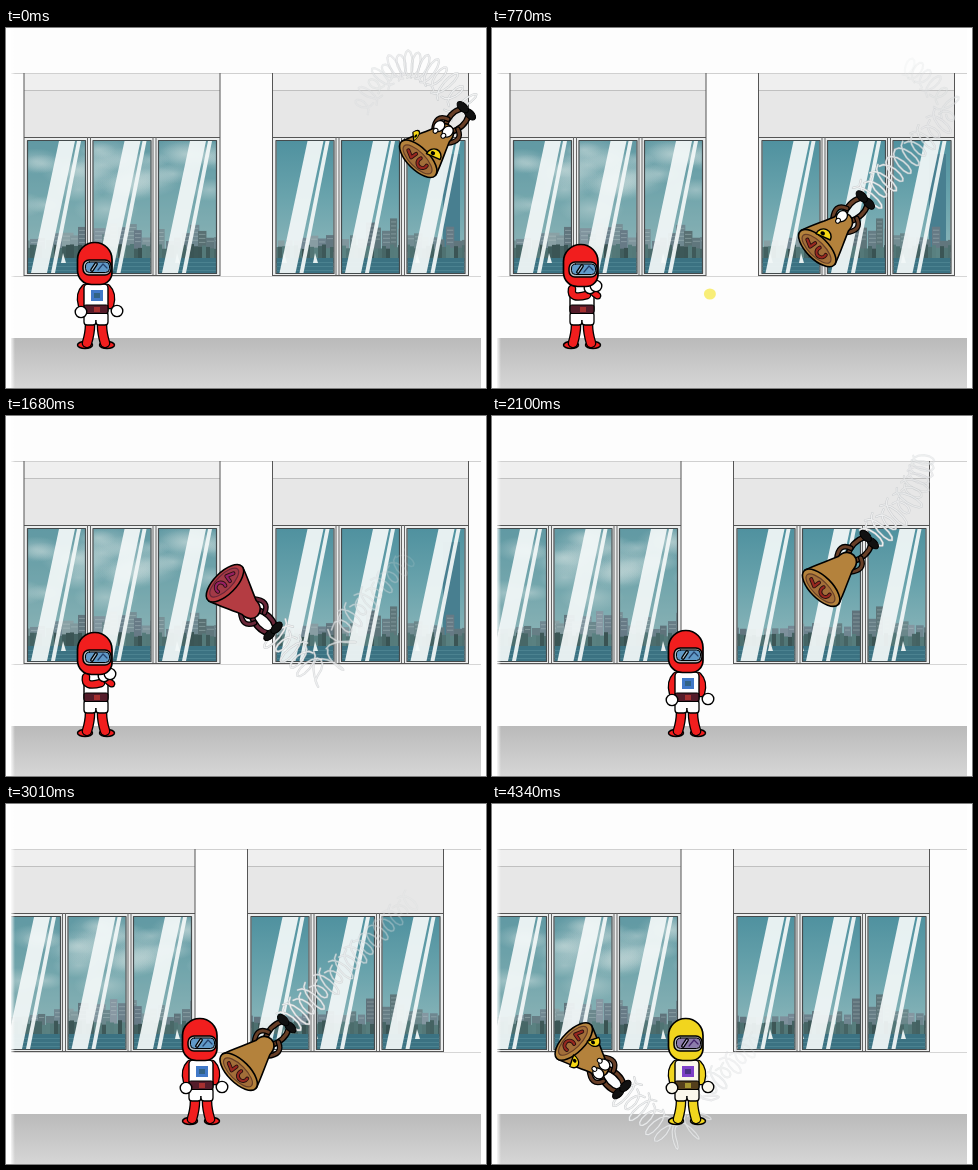
Write an HTML page with a canvas that moves like this. It is 480x360 px and loops after 4.41 s.

```html
<!DOCTYPE html>
<html lang="en">
<head>
<meta charset="utf-8">
<title>Hallway fight</title>
<style>
html, body { margin: 0; width: 100%; height: 100%; overflow: hidden; background: #fff; }
canvas { display: block; width: 480px; height: 360px; }
</style>
</head>
<body>
<canvas id="stage" width="480" height="360"></canvas>
<script>
const ctx = document.getElementById('stage').getContext('2d');
const STEP = 70, STEPS = 63, CUT = 1.75, SPEED = 155, TAU = Math.PI * 2;
const SIDES = [-1, 1];

const tint = (h, s, l) => `hsl(${h},${s}%,${l}%)`;
const clamp = v => Math.min(1, Math.max(0, v));
const rand = n => {
  const v = Math.sin(n * 12.9898) * 43758.5453;
  return v - Math.floor(v);
};

function rect(x, y, w, h, fill) {
  ctx.fillStyle = fill;
  ctx.fillRect(x, y, w, h);
}

function paint(fill, line = 1.4, color = '#000') {
  if (fill) { ctx.fillStyle = fill; ctx.fill(); }
  if (line) { ctx.lineWidth = line; ctx.strokeStyle = color; ctx.stroke(); }
}

function oval(x, y, rx, ry, fill, line, color) {
  ctx.beginPath();
  ctx.ellipse(x, y, rx, ry, 0, 0, TAU);
  paint(fill, line, color);
}

function box(x, y, w, h, r, fill, line) {
  ctx.beginPath();
  ctx.roundRect(x, y, w, h, r);
  paint(fill, line);
}

// A curved thick stroke with a dark edge
function limb(a, b, c, width, fill) {
  ctx.beginPath();
  ctx.moveTo(...a);
  ctx.quadraticCurveTo(...b, ...c);
  paint(null, width + 2.6);
  paint(null, width, fill);
}

function blend(x0, y0, x1, y1, ...colors) {
  const g = ctx.createLinearGradient(x0, y0, x1, y1);
  colors.forEach((c, i) => g.addColorStop(i / (colors.length - 1), c));
  return g;
}

// ---------- scenery ----------
function cloud(x, y, r) {
  const g = ctx.createRadialGradient(0, 0, 0, 0, 0, r);
  g.addColorStop(0, 'rgba(196,216,216,.5)');
  g.addColorStop(1, 'rgba(196,216,216,0)');
  ctx.save();
  ctx.translate(x, y);
  ctx.scale(1.7, .8);
  rect(-r, -r, 2 * r, 2 * r, g);
  ctx.restore();
}

function cityView() {
  rect(0, 112, 480, 136, blend(0, 112, 0, 225, '#4f919f', '#69a3ac', '#8ab5b9'));
  rect(0, 112, 230, 136, 'rgba(140,172,174,.28)');
  for (let i = 1; i < 26; i++) cloud(220 * rand(i), 120 + 70 * rand(i + 50), 10 + 12 * rand(i + 90));
  rect(437, 126, 17, 96, '#487f90');
  for (let i = 0; i < 60; i++) {
    const x = i * 8, peak = Math.cos((x - 130) * Math.PI / 260) ** 2;
    const y = 213 - 26 * peak * rand(i + 7), w = 6 + 6 * rand(i + 30);
    rect(x, y, w, 224 - y, tint(185 + 20 * rand(i), 13, 40 + 20 * rand(i + 3)));
    for (let r = y + 3; r < 214; r += 4) rect(x + 1, r, w - 2, 1, 'rgba(190,208,208,.35)');
  }
  for (let x = 0; x < 480; x += 4) rect(x, 216 + 5 * rand(x), 4, 16, tint(180, 18, 27 + 17 * rand(x + 1)));
  rect(0, 230, 480, 18, '#3b7282');
  for (let y = 234; y < 247; y += 4) rect(0, y, 480, 1, '#4b8290');
  for (const x of [57, 171, 278, 309, 411]) {
    ctx.beginPath();
    ctx.moveTo(x, 225);
    ctx.lineTo(x + 3, 235);
    ctx.lineTo(x - 2, 235);
    paint('#e4eeee', 0);
  }
}

function glare(top, bottom, width) {
  ctx.beginPath();
  ctx.moveTo(top, 113);
  ctx.lineTo(top + width, 113);
  ctx.lineTo(bottom + width, 245);
  ctx.lineTo(bottom, 245);
  paint('rgba(243,248,248,.93)', 0);
}

function room(dx) {
  const bays = [18 + dx, 266.5 + dx];
  const panes = bays.flatMap(x => [0, 1, 2].map(i => x + 4 + 65.5 * i));
  ctx.save();
  ctx.beginPath();
  ctx.rect(5, 0, 470, 360);
  ctx.clip();
  rect(0, 0, 480, 360, '#fdfdfd');
  rect(0, 45, 480, 1, '#d0d0d0');
  rect(0, 248, 480, 1, '#d6d6d6');
  for (const x of bays) {
    rect(x, 46, 196, 16, '#efefef');
    rect(x, 62, 196, 47, '#e7e7e7');
    rect(x, 62, 196, 1, '#c0c0c0');
    rect(x, 109, 196, 139, '#eceeee');
    for (const d of [-.5, 195.5]) rect(x + d, 45, 1, 203, '#555');
    for (const y of [109, 247]) rect(x, y, 196, 1, '#555');
    for (const d of [64, 129.5]) for (const gap of [-1, 2]) rect(x + d + gap, 109, 1, 138, '#666');
  }
  ctx.save();
  ctx.beginPath();
  panes.forEach(x => ctx.rect(x, 113, 57, 132));
  ctx.clip();
  cityView();
  for (const x of panes) {
    glare(x + 31, x + 3, 16);
    glare(x + 49, x + 23, 4);
  }
  ctx.restore();
  ctx.lineWidth = 1.2;
  ctx.strokeStyle = '#444b4d';
  panes.forEach(x => ctx.strokeRect(x - .5, 112.5, 58, 133));
  rect(0, 310, 480, 50, blend(0, 310, 0, 360, '#bababa', '#d6d6d6'));
  rect(5, 0, 4, 360, blend(5, 0, 9, 0, 'rgba(255,255,255,.8)', 'rgba(255,255,255,0)'));
  ctx.restore();
}

// ---------- flight ----------
const dives = [
  { x: 437, y: 106, vx: -113, vy: 116, turn: 1.11, bend: .18, lead: 1.1, ctrl: [395, -15], start: [350, 92] },
  { x: 391, y: 110, vx: -106, vy: 105.5, turn: 1.9, bend: .25, lead: .5, ctrl: [430, 60], start: [432, 40] }
];

const heading = (d, t) => Math.PI * (.75 + .5 * clamp((t - d.turn) / d.bend));

function flight(d, t) {
  const s = Math.min(t, d.turn);
  let x = d.x + d.vx * s, y = d.y + d.vy * s;
  for (let u = s; u < t; u += .01) {
    const h = Math.min(.01, t - u), a = heading(d, u + h / 2);
    x += Math.cos(a) * SPEED * h;
    y += Math.sin(a) * SPEED * h;
  }
  return { x, y, a: heading(d, t) };
}

function feet(d, t) {
  const p = flight(d, Math.max(0, t));
  const end = [p.x - 33 * Math.cos(p.a), p.y - 33 * Math.sin(p.a)];
  if (t >= 0) return end;
  const u = -t / d.lead, v = 1 - u;
  return end.map((e, i) => v * v * e + 2 * u * v * d.ctrl[i] + u * u * d.start[i]);
}

// One coil of smoke per step, fading with age
function smoke(d, t) {
  const life = 1.2, loop = STEP / 1000;
  for (let k = Math.ceil(Math.max(-d.lead, t - life) / loop); (k + 1) * loop <= t + .001; k++) {
    const fade = clamp(1 - (t - k * loop) / life);
    const size = (10 + 8 * Math.abs(Math.sin(k * 1.7))) * (.6 + .4 * fade);
    ctx.beginPath();
    for (let i = 0; i <= 12; i++) {
      const u = (k + i / 12) * loop, w = i / 12 * TAU;
      const [x, y] = feet(d, u), [px, py] = feet(d, u - .02);
      const a = Math.atan2(y - py, x - px);
      const across = size * Math.cos(w), along = 6 * Math.sin(w);
      ctx.lineTo(x + along * Math.cos(a) - across * Math.sin(a), y + along * Math.sin(a) + across * Math.cos(a));
    }
    ctx.globalAlpha = .08 + .8 * fade;
    paint(null, 2.2, '#bfc3c6');
    paint(null, 1.2, '#fafafa');
  }
  ctx.globalAlpha = 1;
}

// ---------- bell creature ----------
function bell(p, spin, hue) {
  const skin = tint(35 + hue, 50, 47), dark = tint(22 + hue, 45, 28), mark = tint(4 + hue, 65, 36);
  // Draws a part on the skin at an angle around the axis, when it faces us
  const facing = (angle, draw) => {
    const c = Math.cos(spin + angle);
    if (c > .12) draw(Math.sin(spin + angle), c);
  };
  ctx.save();
  ctx.translate(p.x, p.y);
  ctx.rotate(p.a);
  for (const s of SIDES) {
    limb([-6, s * 4], [-20, s * 11], [-31, s * 5], 3.4, dark);
    limb([4, s * 9], [-9, s * 20], [-14, s * 7], 3, dark);
    oval(-33, s * 5, 4, 7, '#111', 1);
  }
  ctx.beginPath();
  ctx.moveTo(34, -24);
  ctx.bezierCurveTo(25, -21, 13, -15, 1, -10);
  ctx.bezierCurveTo(-15, -10, -15, 10, 1, 10);
  ctx.bezierCurveTo(13, 15, 25, 21, 34, 24);
  paint(skin, 1.6);
  oval(35, 0, 11, 24, skin, 1.6);
  oval(36, 0, 7.5, 19, tint(30 + hue, 48, 43), 1.2, dark);
  ctx.beginPath();
  ctx.arc(35, -6, 5, -1.8, 2);
  ctx.moveTo(33, 5);
  ctx.lineTo(39, 6);
  ctx.lineTo(36, 13);
  paint(null, 4, '#2a1010');
  paint(null, 2.2, mark);
  for (const s of SIDES) {
    facing(s * .75, (y, c) => {
      ctx.save();
      ctx.translate(20, y * 21);
      ctx.scale(1, Math.max(.4, c));
      ctx.rotate(s * .35);
      ctx.beginPath();
      ctx.ellipse(3, 0, 8, 8, 0, Math.PI / 2, Math.PI * 1.5);
      ctx.closePath();
      paint(tint(52 + hue, 92, 52), 1.5);
      oval(0, -s * 2, 2, 2.4, '#000', 0);
      ctx.restore();
    });
    facing(s * .5, y => {
      oval(-4 + s, y * 11, 6, 5, '#fff', 1.3);
      oval(2 + s, y * 10, 2.6, 2.2, '#fff', 1);
    });
  }
  ctx.restore();
}

// ---------- astronaut ----------
function hero(x, aiming, hue, dip) {
  const suit = tint(hue, 88, 53), belt = tint(hue - 15, 50, 22), white = hue ? '#faf7ec' : '#fff';
  const visor = tint(207 + hue, hue ? 22 : 48, 58), badge = tint(215 + hue, 55, 52);
  const glove = (gx, gy) => oval(gx, gy, 5.8, 5.6, white, 1.4);
  ctx.save();
  ctx.translate(x - 90, 0);

  for (const s of SIDES) {
    oval(90 + s * 11, 317, 7.5, 3.6, suit, 1.5);
    limb([90 + s * 6, 297], [90 + s * 6, 305], [90 + s * 9, 315], 8, suit);
    box(s < 0 ? 78 : 90, 284, 12, 13, 3, white, 1.3);
    if (!aiming) limb([90 + s * 11, 260], [90 + s * 17, 266], [90 + s * 14, 277], 6, suit);
  }
  box(78, 256, 24, 30, 4, white, 1.4);
  rect(79, 284, 22, 8, white);
  box(78, 277, 24, 8.5, 2, belt, 1.2);
  rect(88, 279, 6, 5, tint(hue, 55, 42));
  if (aiming) {
    limb([80, 261], [78, 272], [95, 267], 6, suit);
    limb([98, 262], [110, 271], [103, 266], 5, suit);
    glove(98, 260);
    glove(104, 258);
  } else {
    rect(85, 262, 12, 11, badge);
    rect(88, 265, 6, 5, tint(205 + hue, 45, 36));
    glove(75, 284);
    glove(111, 283);
  }

  ctx.translate(0, dip);
  box(71.5, 214.5, 34.5, 42, [17, 17, 12, 14], suit, 1.7);
  box(77, 232, 28, 15, 6, '#b4b8bb', 1.5);
  box(79.5, 234, 24, 10.5, 4, visor, 1);
  limb([86, 242], [88, 239], [90, 236], 1.2, tint(205 + hue, 45, 78));
  ctx.beginPath();
  ctx.moveTo(92, 242);
  ctx.lineTo(97, 236);
  ctx.lineTo(101, 240);
  paint(null, 1.2, tint(215 + hue, 50, 28));
  ctx.restore();
}

// ---------- scenes ----------
// Colours cycle from the moment of a hit
const cycle = (t, hit) => Math.max(0, t - hit) * 460;

function ambush(t) {
  const d = dives[0], hit = .98, aiming = t > .2;
  room(0);
  smoke(d, t);
  bell(flight(d, t), .35 + TAU * t / .7, cycle(t, hit));
  hero(90, aiming, 0, aiming ? 2 : 0);
  for (const [from, to] of [[.42, hit], [1.12, 1.5]]) {
    if (t >= from && t < to) oval(108 + 314 * (t - from), 266, 6, 5.5, '#f8ee78', 0);
  }
}

function collision(t) {
  const d = dives[1], hit = 1.694;
  room(-25);
  smoke(d, t);
  bell(flight(d, t), t < 2 ? .2 + TAU * (t - 1.89) / .44 : 0, 0);
  hero(195, false, cycle(t, hit), t > hit && t < 2.1 ? 4 : 0);
}

const begin = performance.now();

function frame(now) {
  const t = Math.floor(Math.max(0, now - begin) / STEP) % STEPS * STEP / 1000;
  ctx.clearRect(0, 0, 480, 360);
  ctx.lineJoin = ctx.lineCap = 'round';
  if (t < CUT) ambush(t); else collision(t - CUT);
  requestAnimationFrame(frame);
}
requestAnimationFrame(frame);
</script>
</body>
</html>
```
